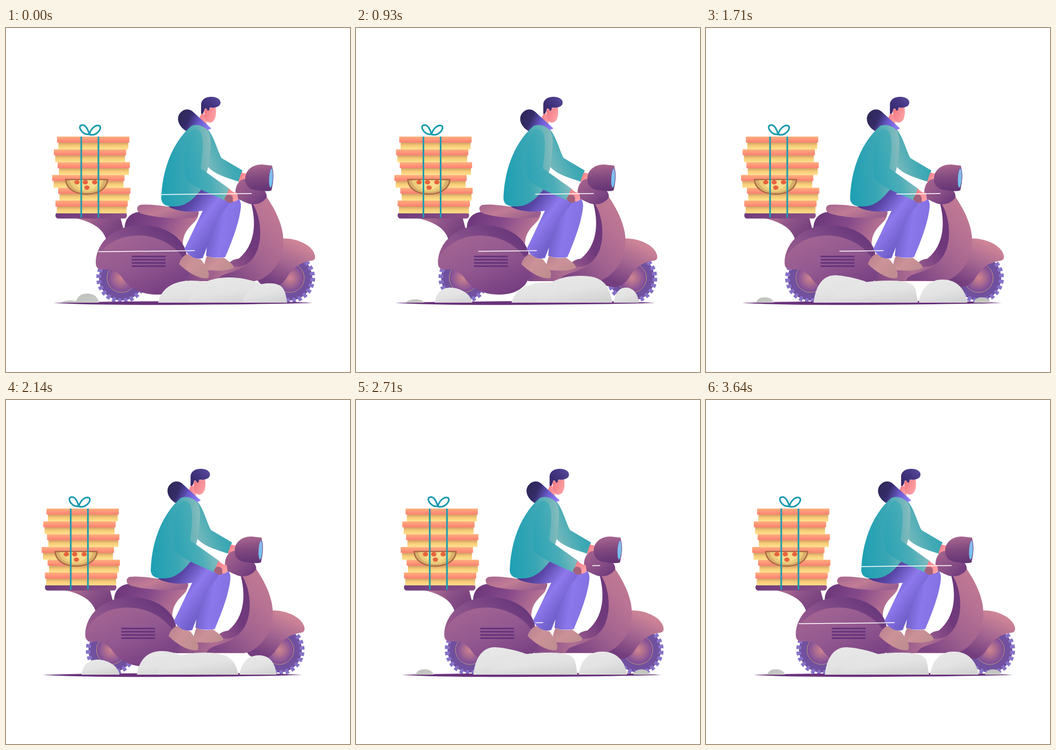
These frames come from a looping animation (640x640 px, 3.71 s). An HTML page:

```html
<!DOCTYPE html>
<html lang="en">
<head>
<meta charset="utf-8">
<title>Scooter delivery</title>
<style>
html, body { margin: 0; width: 100%; height: 100%; overflow: hidden; background: #fff; }
svg { display: block; width: 100vw; height: 100vh; }
</style>
</head>
<body>
<svg id="stage" viewBox="0 0 640 640"></svg>
<script>
const LOOP = 3710, FRAMES = 52, PUFF_LOOP = 480;

// name: [x1, y1, x2, y2 in the shape's box, colours]
const gradients = {
  lid: [0, 0, 0, 1, '#ffb07c', '#ff7f74'],
  box: [0, 0, 0, 1, '#cb9660', '#f6cb77', '#ffe28a'],
  rack: [0, 0, 1, 0, '#6f3c7b', '#8b4f86'],
  arm: [0, 0, 1, .4, '#c07b94', '#8f558a', '#743f7c'],
  under: [0, 0, 1, .3, '#683578', '#85498a', '#c07a95'],
  seat: [0, 0, 1, .6, '#a4648f', '#c17c95', '#9c5f8e'],
  cowl: [0, 1, 1, .3, '#a86590', '#88508b', '#65357a'],
  panel: [.1, 0, .8, 1, '#a66692', '#925890', '#743c80'],
  floor: [0, 0, 1, 0, '#7c4383', '#b06f92', '#8d5288'],
  shield: [1, 0, .2, 1, '#c67e94', '#b87293', '#a0618f', '#7d4584'],
  strip: [1, 0, 0, 1, '#6a3779', '#70397c', '#985a8d'],
  fender: [.7, .1, .25, .9, '#cd8496', '#a36591', '#733d7e'],
  lamp: [.4, 0, .5, 1, '#a9678f', '#80487f', '#643475'],
  neck: [0, 0, 1, 1, '#a9668f', '#8b5087', '#66347a'],
  lens: [0, 0, 0, 1, '#8fb7ec', '#6cc6ee'],
  hair: [0, .8, 1, 0, '#352768', '#443582', '#5b4d9e'],
  hood: [0, .3, 1, .6, '#2d2857', '#352c69', '#6c5bd0', '#8c7cf2'],
  skin: [0, 0, 1, .5, '#f0757f', '#fda0a5'],
  coat: [0, .4, 1, .3, '#20a0b4', '#39a6b4', '#86bcbd'],
  farArm: [0, .8, 1, .2, '#7dbbbd', '#43aab5', '#25a2b4'],
  nearArm: [0, .6, 1, .3, '#2ba3b4', '#4badb7', '#a0c4c3'],
  nearLeg: [.1, .1, .75, .65, '#433181', '#5a47a8', '#8e79ed', '#7260cc'],
  farLeg: [0, .3, 1, .6, '#6655bd', '#8b78ec', '#8270df'],
  shoe: [0, 0, 1, .6, '#b87f90', '#cc9298', '#c08e91'],
  puff: [.3, 0, .8, 1, '#e8e8e8', '#e3e3e3', '#d2d2d2'],
  smallPuff: [0, 0, 1, 1, '#c0c0bd', '#c8cbc5']
};
const defs = Object.entries(gradients).map(([id, [x1, y1, x2, y2, ...stops]]) =>
  `<linearGradient id="${id}" x1="${x1}" y1="${y1}" x2="${x2}" y2="${y2}">` +
  stops.map((c, i) => `<stop offset="${i / (stops.length - 1)}" stop-color="${c}"/>`).join('') +
  '</linearGradient>').join('') +
  '<radialGradient id="hub"><stop stop-color="#cf8492"/><stop offset=".35" stop-color="#b3708f"/>' +
  '<stop offset="1" stop-color="#75479a"/></radialGradient>';

const shape = (fill, d) => `<path fill="url(#${fill})" d="${d}"/>`;
const rect = (fill, x, y, w, h, r = 0) =>
  `<rect fill="${fill}" x="${x}" y="${y}" width="${w}" height="${h}" rx="${r}"/>`;

const wheel = x => `<g transform="translate(${x} 465)">
  <circle r="42" fill="#7250a1"/>
  <circle class="tread" r="42.5" fill="none" stroke="#8572c8" stroke-width="9" pathLength="48" stroke-dasharray="1.15 .85"/>
  <circle r="37" fill="#70509f"/><circle r="28" fill="url(#hub)"/>
  <circle r="27" fill="none" stroke="#bda178"/></g>`;

const boxes = [95, 89, 96, 86, 97, 92].map((x, i) => {
  const y = 202 + i * 23.8;
  return rect('url(#box)', x + 2.5, y + 10, 130, 13.8) + rect('url(#lid)', x, y, 134.5, 11);
}).join('');

const pepperoni = [[132, 287], [147.5, 287], [165, 287], [150.5, 297]].map(([x, y]) =>
  `<ellipse cx="${x}" cy="${y}" rx="5" ry="4" fill="#e9633f"/>`).join('');

const parcel = boxes + `
  <path d="M111 282H189C188 300 170 309 150 309S112 300 111 282Z" fill="#d9b06a" stroke="#aa6945" stroke-width="2.6"/>
  <path d="M119 283H181C180 297 166 305 150 305S120 297 119 283Z" fill="#eccb79"/>
  <path d="M127 283H173C172 294 162 301 150 301S128 294 127 283Z" fill="#f6dd8d"/>${pepperoni}
  <g fill="none" stroke="#1b9bb0" stroke-width="3"><path d="M140 202V353M172 202V353"/>
  <path d="M155 198C141 199 133 183 140 181C148 178 153 190 155 198C158 186 168 179 174 182C180 187 168 202 155 198Z"/></g>`;

const vents = [0, 1, 2, 3].map(i => rect('#62317a', 234, 423.7 + i * 6, 63, 2.8)).join('');

const scooter =
  shape('arm', 'M126 353H213L219 376L188 398C181 371 160 361 126 353Z') +
  rect('url(#rack)', 92, 343, 133, 11.5, 5.5) +
  shape('under', 'M221 377C219 356 231 343 250 342L357 350C354 365 328 371 329 405L300 420H225Z') +
  shape('seat', 'M250 329C275 326 315 336 350 337Q361 338 358 347Q357 353 346 353C310 356 270 351 251 345Q244 342 244 336Q244 331 250 329Z') +
  shape('floor', 'M332 444H415C430 444 446 442 466 425L480 462L463 471H335Z') +
  shape('fender', 'M505 393C530 387 571 401 575 424Q576 432 568 433C543 437 532 449 522 465Q512 481 495 482Q472 481 467 467Z') +
  shape('shield', 'M456 321L484 313C503 340 516 370 516 396C516 435 490 464 468 470H393C398 455 424 458 446 441C474 416 476 364 456 321Z') +
  shape('strip', 'M455 322C466 334 473 358 473 381C473 413 459 440 434 444H411Q416 431 433 429C465 403 466 360 455 322Z') +
  shape('cowl', 'M167 437C167 397 205 366 250 367C297 367 326 389 335 415L341 470H323L200 449H175Q167 447 167 437Z') +
  shape('panel', 'M168 431C180 403 211 386 247 386C290 387 323 411 335 438C345 465 328 496 281 496C250 496 229 484 215 463Q203 448 176 447Q166 446 168 431Z') +
  vents;

const rider =
  shape('farLeg', 'M384 312L428 315Q438 319 437 333C434 363 419 400 408 426Q391 430 372 424Z') +
  shape('shoe', 'M374 424Q388 430 405 427C414 434 423 439 424 446C414 453 388 452 369 450Q368 436 374 424Z') +
  shape('shoe', 'M338 420Q349 429 362 430C373 444 381 456 376 465C362 469 338 455 322 439Q326 425 338 420Z') +
  shape('nearLeg', 'M302 332C325 327 344 318 360 299L413 308Q423 317 411 333Q397 348 391 364L366 428Q345 433 332 411L366 340C340 344 314 340 302 332Z') +
  shape('farArm', 'M375 188C388 203 393 228 401 242L440 265L433 286C410 278 386 272 374 256Z') +
  shape('skin', 'M365 156L374 169L372 184L357 174Z') +
  shape('hood', 'M325 157C332 150 341 150 348 156L382 187L372 191L347 186L336 192C321 184 315 167 325 157Z') +
  shape('coat', 'M345 182C316 207 292 252 289 313Q287 332 310 332C336 333 351 316 366 297L377 255C381 218 384 198 372 187Q358 177 345 182Z') +
  shape('nearArm', 'M350 188C368 187 369 213 362 261L417 300L408 321C382 309 347 296 335 281C328 253 333 193 350 188Z') +
  shape('skin', 'M369 151L390 147C392 160 390 176 379 176C371 176 368 165 369 151Z') +
  shape('hair', 'M363 160V143C363 132 373 128 382 128C394 128 400 134 399 140C398 147 388 149 380 148Q378 149 378 153L375 154Q374 149 370 150C368 153 369 160 363 160Z');

const front =
  shape('skin', 'M438 269L448 271L444 283L432 286Z') +
  shape('neck', 'M427 302C429 287 438 279 449 281L478 300Q486 307 485 315Q476 328 459 328C448 328 436 318 427 317Z') +
  shape('lamp', 'M445 279C446 263 461 253 477 254L495 256Q500 278 494 302Q487 305 470 302C456 302 444 295 445 279Z') +
  '<ellipse cx="493" cy="279" rx="4" ry="18" fill="url(#lens)" stroke="#71508e" stroke-width="1" transform="rotate(3 493 279)"/>' +
  shape('skin', 'M415 299Q421 306 430 307L432 319Q426 325 419 322L407 318Z') +
  '<path d="M410 311Q420 308 422 316V324Q413 328 406 318Z" fill="#a4617c"/>';

const stage = document.getElementById('stage');
stage.innerHTML = `<defs>${defs}</defs><g id="ride">
  ${wheel(215)}${wheel(528)}
  <path d="M88 511.5Q150 509 330 508T571 511.5Q500 514 330 515T88 511.5Z" fill="#6a337c"/>
  ${scooter}${parcel}${rider}${front}
  <g id="puffs"></g>
  <path id="streaks" stroke="#fff" stroke-width="1.5" fill="none"/></g>`;
const ride = document.getElementById('ride');
const puffs = document.getElementById('puffs');
const streaks = document.getElementById('streaks');
const treads = document.querySelectorAll('.tread');

// Dust drawings: start in the puff loop, then [left, right, top, peak x]
const middle = [[191, 288, 471, 221], [304, 430, 473, 372], [350, 491, 461, 432], [494, 541, 483, 517]];
const dust = [
  [0, [[104, 136, 507, 120], [130, 173, 494, 151], [283, 430, 470, 345], [340, 505, 464, 415], [440, 523, 475, 490]]],
  [120, [[160, 231, 483, 190], [263, 380, 467, 309], [300, 452, 470, 389], [454, 523, 475, 490]]],
  [245, [[114, 147, 501, 130], [221, 370, 460, 261], [250, 415, 470, 361], [417, 507, 468, 461], [519, 549, 501, 534]]],
  [350, [[114, 148, 501, 131], ...middle]],
  [440, [[108, 141, 505, 125], [161, 231, 483, 190], ...middle.slice(1)]]
];
const drawings = dust.map(([, list]) => list.map(([l, r, top, peak]) => {
  const side = top + (511 - top) * .3, at = (a, k) => a + (peak - a) * k;
  return shape(top > 490 ? 'smallPuff' : 'puff',
    `M${l} 511C${at(l, .1)} ${side} ${at(l, .5)} ${top} ${peak} ${top}S${at(r, .1)} ${side} ${r} 511Z`);
}).join(''));

const sway = [[0, 0], [430, -6.8], [640, -10], [930, -14.6], [1210, -17.6], [1710, -20.8], [1860, -21],
  [2140, -19.6], [2290, -17.3], [2600, -5.5], [2710, -2.8], [2930, -1.7], [3640, 0], [LOOP, 0]];
const reach = [[0, 1], [430, .54], [930, .61], [1710, .46], [2140, 0], [2640, 0], [2710, .08], [3640, 1], [LOOP, 1]];

function track(keys, t) {
  const i = keys.findIndex(([time]) => time > t);
  const [t0, a] = keys[i - 1], [t1, b] = keys[i];
  return a + (b - a) * (t - t0) / (t1 - t0);
}

let shown = -1;
function draw(now) {
  const step = LOOP / FRAMES;
  const t = Math.floor((now + 4) / step) % FRAMES * step;
  ride.setAttribute('transform', `translate(${track(sway, t)} 0)`);
  treads.forEach(tread => tread.setAttribute('transform', `rotate(${t / LOOP * 1440})`));

  const phase = t % PUFF_LOOP;
  const pose = dust.filter(([start]) => start <= phase).length - 1;
  if (pose !== shown) puffs.innerHTML = drawings[shown = pose];

  const k = track(reach, t);
  streaks.setAttribute('d', k ? [[457, 308], [351, 414.3]].map(([x, y]) =>
    `M${x} ${y}L${x - 179 * k} ${y + 2 * k}`).join('') : '');
  requestAnimationFrame(draw);
}
requestAnimationFrame(draw);
</script>
</body>
</html>
```
